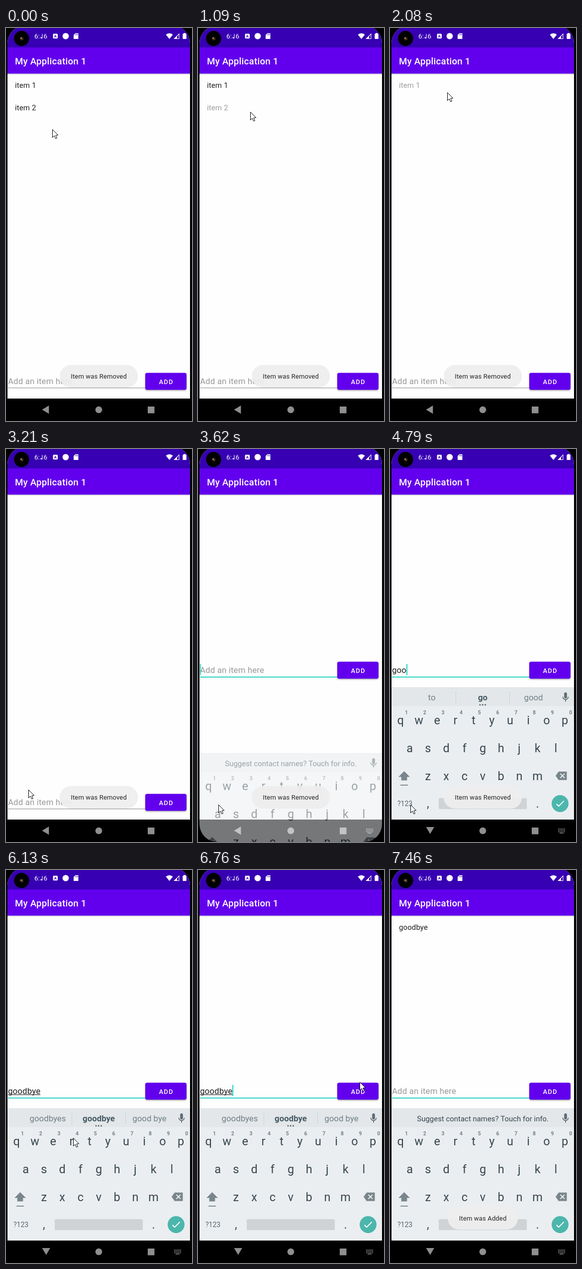
These frames come from a looping animation (374 by 788 pixels, 7.58 s). An HTML page with a canvas:

```html
<!DOCTYPE html>
<html lang="en">
<head>
<meta charset="utf-8">
<title>List app</title>
<style>
html, body { margin: 0; width: 100%; height: 100%; overflow: hidden; background: #000; }
canvas { display: block; width: 374px; height: 788px; }
</style>
</head>
<body>
<canvas id="stage"></canvas>
<script>
const W = 374, H = 788, LOOP = 7580, FRAME = 133;
const INK = '#1f1f1f', KEY = '#37474f', TEAL = '#12cdbf', PURPLE = '#6200ee';
const BOARD = '#ebeef1';

// Moments of the story, in ms.
const TAP_2 = 960, TAP_1 = 2080, FADE = 135;
const LEAVE = 3500, FOCUS = 3620, TYPE = 4490, LETTER = 138, ADDED = 6780;
const WORD = 'goodbye';

const dpr = window.devicePixelRatio || 1;
const stage = document.getElementById('stage');
const layer = document.createElement('canvas');
for (const cv of [stage, layer]) {
  cv.width = W * dpr;
  cv.height = H * dpr;
}
let c = stage.getContext('2d');

const clamp = v => Math.min(1, Math.max(0, v));
const ease = k => k * k * (3 - 2 * k);

function pointerAt(t) {
  const now = Math.floor(t / FRAME) * FRAME;
  const glides = [
    { from: 0, to: 410, x: 105, y: 168 },
    { from: 1100, to: 1500, x: 115, y: 129 },
    { from: 2520, to: 3300, x: 41, y: 713 },
    { from: 5800, to: 6110, x: 135, y: 537 },
    { from: 6110, to: 6500, x: 325, y: 425 },
    { from: ADDED, to: 7320, x: 362, y: 800 },
  ];
  let x = 93, y = 203;
  for (const g of glides) {
    const k = ease(clamp((now - g.from) / (g.to - g.from)));
    x += (g.x - x) * k;
    y += (g.y - y) * k;
  }
  return [Math.round(x), Math.round(y)];
}

function typedAt(t) {
  if (t < TYPE || t >= ADDED) return '';
  return WORD.slice(0, 1 + Math.floor((t - TYPE) / LETTER));
}

function caretOn(t) {
  if (t < FOCUS) return false;
  const lastKey = TYPE + LETTER * (WORD.length - 1);
  if (t >= TYPE && t < lastKey) return true;
  const since = t >= ADDED ? ADDED : t >= lastKey ? lastKey : FOCUS;
  return (t - since) % 1000 < 500;
}

function rect(x, y, w, h, color) {
  c.fillStyle = color;
  c.fillRect(x, y, w, h);
}

function round(x, y, w, h, r, color) {
  c.fillStyle = color;
  c.beginPath();
  c.roundRect(x, y, w, h, r);
  c.fill();
}

function disc(x, y, r, color) {
  c.fillStyle = color;
  c.beginPath();
  c.arc(x, y, r, 0, 7);
  c.fill();
}

function path(points) {
  c.beginPath();
  points.forEach(([x, y]) => c.lineTo(x, y));
}

function poly(points, color) {
  path(points);
  c.fillStyle = color;
  c.fill();
}

function line(points, color, width) {
  path(points);
  c.strokeStyle = color;
  c.lineWidth = width;
  c.stroke();
}

function text(str, x, y, size, color, { weight = 400, align = 'left', gap = 0 } = {}) {
  c.font = `${weight} ${size}px Roboto, sans-serif`;
  c.letterSpacing = gap + 'px';
  c.textAlign = align;
  c.fillStyle = color;
  c.fillText(str, x, y);
}

function statusBar() {
  const bar = '#3700b3';
  rect(0, 0, W, 39, bar);
  text('6:', 57, 21, 13.5, '#fff');
  line([[73, 12], [73, 21]], '#fff', 1.1);
  disc(70.8, 19.6, 1.4, '#fff');
  text('6', 75.5, 21, 13.5, '#fff');
  round(94.5, 11.5, 9.5, 9.5, 1.5, '#fff');
  text('A', 99.3, 19.2, 8, bar, { weight: 700, align: 'center' });
  disc(120, 16.2, 6.3, '#fff');
  poly([[139.5, 10.5], [145.5, 10.5], [145.5, 22], [136, 22], [136, 14]], '#fff');
  for (let i = 0; i < 3; i++) rect(139.5 + i * 2, 12, 0.9, 2.5, bar);

  c.fillStyle = '#fff';
  c.beginPath();
  c.moveTo(328.5, 22);
  c.lineTo(321.5, 13.3);
  c.quadraticCurveTo(328.5, 7.5, 335.5, 13.3);
  c.fill();
  poly([[348.5, 10.5], [348.5, 22], [337, 22]], '#fff');
  poly([[347.4, 13.3], [347.4, 20.9], [344, 20.9], [344, 16.7]], bar);
  round(355.3, 11.5, 7.5, 10.5, 1, '#fff');
  rect(357.2, 10, 3.7, 2, '#fff');
}

function appBar() {
  const g = c.createLinearGradient(0, 91, 0, 94.5);
  g.addColorStop(0, 'rgba(0,0,0,.2)');
  g.addColorStop(1, 'rgba(0,0,0,0)');
  rect(0, 91, W, 3.5, g);
  rect(0, 39, W, 52.5, PURPLE);
  text('My Application 1', 18, 73, 18.7, '#fff', { weight: 500, gap: 0.23 });
}

function item(str, row, age = -1) {
  if (age >= FADE) return;
  text(str, 18, 120 + row * 44.8, 14.94, age < 0 ? INK : '#9c9c9c', { gap: 0.14 });
}

function list(t) {
  item('item 1', 0, t - TAP_1);
  item('item 2', 1, t - TAP_2);
  if (t >= ADDED) item(WORD, 0);
}

function inputRow(t) {
  if (t >= LEAVE && t < FOCUS) return;
  const focus = t >= FOCUS;
  const y = focus ? 443 : 708;
  const typed = typedAt(t);
  text(typed || 'Add an item here', 4, y + 6, 16.81, typed ? INK : '#999', { gap: 0.15 });
  const width = typed ? c.measureText(typed).width : 0;
  if (typed === WORD) rect(4, y + 7, width, 1.1, INK);

  if (focus) rect(4, y + 13.4, 277, 1.8, TEAL);
  else rect(4, y + 13.2, 277, 1, '#858585');
  if (caretOn(t)) rect(4 + width, y - 12, 1.8, 22.5, TEAL);

  c.save();
  c.shadowColor = 'rgba(0,0,0,.35)';
  c.shadowBlur = 3 * dpr;
  c.shadowOffsetY = 1.5 * dpr;
  round(280, y - 16.5, 83, 34, 3.7, PURPLE);
  c.restore();
  text('ADD', 307.5, y + 5.5, 13.07, '#fff', { weight: 500, gap: 1.17 });
}

function mic(x, y) {
  const color = '#5f6d74';
  round(x - 2.8, y - 9.5, 5.6, 12, 2.8, color);
  c.strokeStyle = color;
  c.lineWidth = 1.6;
  c.beginPath();
  c.arc(x, y - 0.8, 5.6, 0, Math.PI);
  c.stroke();
  rect(x - 0.9, y + 4.5, 1.8, 4.5, color);
}

function suggestions(typed) {
  const mid = { align: 'center' };
  if (typed.length < 2) {
    text('Suggest contact names? Touch for info.', 186.7, 503.7, 14.94, KEY, mid);
    return;
  }
  const words = typed.length < 5 ? ['to', 'go', 'good'] : ['goodbyes', WORD, 'good bye'];
  text(words[0], 84, 504, 16.81, '#728087', mid);
  text(words[1], 186.5, 504, 16.81, '#455a64', { weight: 700, align: 'center' });
  text(words[2], 288.5, 504, 16.81, '#728087', mid);
  rect(132, 486, 1, 24, '#cbd1d4');
  rect(240, 486, 1, 24, '#cbd1d4');
  for (let i = -1; i < 2; i++) disc(186.3 + i * 5.3, 513, 1.4, '#455a64');
}

function keyRow(keys, x, y, size = 23.5, color = KEY, weight = 400) {
  [...keys].forEach((k, i) =>
    text(k, x + i * 36.7, y, size, color, { weight, align: 'center' }));
}

function keyboard(typed) {
  const grey = '#79868c';
  rect(0, 478, W, 265, BOARD);
  rect(0, 478, W, 37.5, '#e3e7e9');
  rect(0, 478, W, 1, '#d9dddf');
  suggestions(typed);
  mic(353, 497.5);

  keyRow('qwertyuiop', 21.3, 552);
  keyRow('asdfghjkl', 39.7, 608);
  keyRow('zxcvbnm', 76.4, 664);
  keyRow('1234567890', 33, 531.5, 10.5, '#77838a', 700);

  poly([[28.5, 646], [40, 657.5], [34.3, 657.5], [34.3, 664.5], [22.7, 664.5],
    [22.7, 657.5], [17, 657.5]], grey);
  rect(21, 673, 15, 1.8, grey);
  poly([[333, 655.2], [339, 646.8], [355.5, 646.8], [355.5, 663.8], [339, 663.8]], grey);
  line([[342.5, 651], [351, 659.5]], BOARD, 1.8);
  line([[351, 651], [342.5, 659.5]], BOARD, 1.8);

  text('?123', 15, 716.3, 14, '#56656c');
  keyRow(',', 76.4, 719);
  keyRow('.', 296.6, 719);
  round(98, 700, 177, 22, 2.5, '#cfd3d6');
  disc(342, 711, 17, '#4db6ac');
  line([[334.6, 711.7], [339.2, 716.2], [349.7, 705.7]], '#fff', 1.9);
}

// Drawn as one layer so that it can fade in as a whole.
function slideKeyboard(t, beat) {
  const main = c;
  c = layer.getContext('2d');
  c.setTransform(dpr, 0, 0, dpr, 0, 0);
  c.clearRect(0, 0, W, H);
  c.translate(0, 132 * 0.011 ** beat);
  keyboard(typedAt(t));
  c = main;
  c.save();
  c.globalAlpha = beat ? 1 : 0.5;
  c.drawImage(layer, 0, 0, W, H);
  c.restore();
}

function navIcons(beat) {
  const grey = 'rgba(255,255,255,.56)';
  const turn = 1 - 0.19 ** Math.max(0, beat);
  c.save();
  c.translate(80 + turn * 0.7, 765.3 - turn);
  c.rotate(-turn * Math.PI / 2);
  poly([[-7.5, 0], [6.3, -8.2], [6.3, 8.2]], grey);
  c.restore();
  disc(186.5, 765.5, 6.8, grey);
  rect(285, 759, 13.5, 13.5, grey);
  if (beat < 0) return;
  for (let i = 0; i < 15; i++) {
    rect(338 + (i % 5) * 3, 761 + Math.floor(i / 5) * 2.8, 1.8, 1.6, grey);
  }
  rect(341, 769.3, 8, 1.4, grey);
}

function toast(str, width, alpha) {
  c.save();
  c.globalAlpha = clamp(alpha);
  round(186.6 - width / 2, 675.5, width, 45.5, 22.7, 'rgba(238,238,238,.93)');
  text(str, 186.6, 703.4, 13.07, '#262626', { align: 'center', gap: 0.12 });
  c.restore();
}

function camera() {
  disc(31.3, 21, 15.2, '#000');
  disc(31.5, 21.3, 4, '#2b1c10');
  disc(30.6, 20.6, 1.3, '#c0b09a');
  disc(32.8, 22.3, 1, '#8a5f35');
}

function pointer(x, y) {
  c.save();
  c.translate(x + 0.5, y + 0.5);
  const arrow = [[0, 0], [0, 16], [3.7, 12.6], [6.3, 18.3], [8.9, 17.2], [6.4, 11.6],
    [11.2, 11.3], [0, 0]];
  poly(arrow, '#fff');
  line(arrow, '#000', 1);
  c.restore();
}

function draw(t) {
  const beat = Math.floor((t - FOCUS) / 140);
  c.setTransform(dpr, 0, 0, dpr, 0, 0);
  rect(0, 0, W, H, '#000');

  c.save();
  c.beginPath();
  c.roundRect(3, -5, 367, 793, 36);
  c.clip();
  rect(0, 0, W, 743, '#fefefe');
  statusBar();
  appBar();
  list(t);
  inputRow(t);
  if (beat >= 0) slideKeyboard(t, beat);
  navIcons(beat);
  toast('Item was Removed', 157.5, (5850 - t) / 280);
  toast('Item was Added', 141, (t - ADDED) / 270);
  c.restore();

  camera();
  pointer(...pointerAt(t));
}

const start = performance.now();
function tick() {
  draw((performance.now() - start) % LOOP);
  requestAnimationFrame(tick);
}
tick();
</script>
</body>
</html>
```
